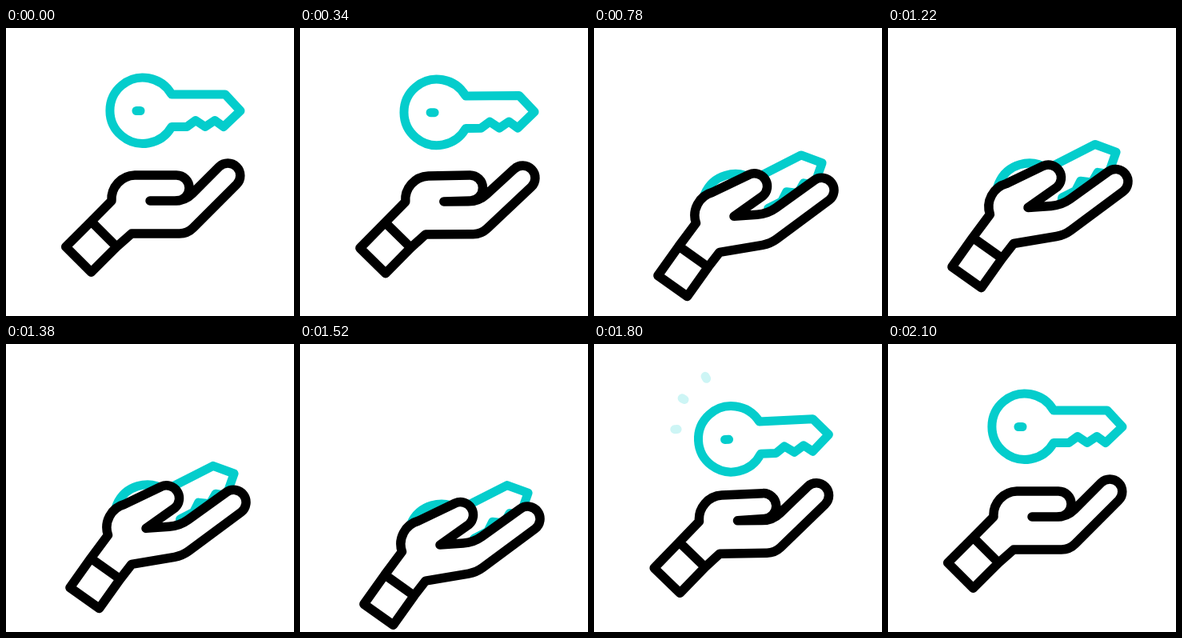
These frames come from a looping animation (360x360 px, 2420 ms). An HTML page:

```html
<!DOCTYPE html>
<html lang="en">
<head>
<meta charset="utf-8">
<title>Hand catching a key</title>
<style>
  html, body { margin: 0; width: 100%; height: 100%; overflow: hidden; background: #fff; }
  svg { display: block; width: 100%; height: 100%; }
  path { fill: none; stroke-linecap: round; stroke-linejoin: round; }
  .teal { stroke: #04cdcc; stroke-width: 11; }
  #hand { fill: #fff; stroke: #000; stroke-width: 11.5; }
</style>
</head>
<body>
<svg viewBox="0 0 360 360">
  <path id="sparks" class="teal"/>
  <g id="key" class="teal">
    <path d="M36-20.5H103L122 0 101 20 90 12 78 20 66 12 55 20H36A41.2 41.2 0 1 1 36-20.5Z"/>
    <path d="M-8 0H-3"/>
  </g>
  <path id="hand"/>
</svg>
<script>
const LOOP = 2420, STEP = 20;
const $ = id => document.getElementById(id);
const hand = $('hand'), key = $('key'), sparks = $('sparks');

const progress = (t, from, to) => Math.min(1, Math.max(0, (t - from) / (to - from)));
const mix = (a, b, k) => a + (b - a) * k;

// Point at a distance and an angle in degrees from a centre.
function polar([x, y], r, deg) {
  const a = deg * Math.PI / 180;
  return [x + r * Math.cos(a), y + r * Math.sin(a)];
}

// Fall to `drop`, settle at `hold`, wind up to `dip`, then spring back to 0.
function motion(t, drop, hold, dip, power) {
  if (t < 720) return drop * progress(t, 220, 720) ** power;
  if (t < 1570) {
    return hold + (drop - hold) * (1 - progress(t, 720, 940)) ** 2
      + (dip - hold) * progress(t, 1220, 1570) ** 2.4;
  }
  return dip * (1 - progress(t, 1570, 2100)) ** 4;
}

// Joints of the hand: open position, closed position.
const JOINTS = {
  cuff:    [[106.5, 273.5], [111.3, 304.8]],
  wrist:   [[132, 216], [127.5, 244.5]],
  knuckle: [[161, 184], [148, 206]],
  thumb:   [[213, 200], [200.5, 198.5]],
  crook:   [[180, 216], [175, 236]],
  web:     [[223.8, 216], [217, 233]],
  finger:  [[277.3, 184.5], [284.5, 203.5]],
  heel:    [[226.8, 257], [220.5, 270.3]],
  palm:    [[157, 257], [157, 281]]
};

const line = p => 'L' + p.join(' ');
const arc = (r, p) => `A${r} ${r} 0 0 1 ${p.join(' ')}`;

function toward(a, b, d) {
  const k = d / Math.hypot(b[0] - a[0], b[1] - a[1]);
  return [mix(a[0], b[0], k), mix(a[1], b[1], k)];
}

function bend(prev, corner, next, d) {
  return line(toward(corner, prev, d)) + `Q${corner.join(' ')} ` + toward(corner, next, d).join(' ');
}

function handPath(t) {
  const grip = motion(t, 1, 1, 1, 2.2);
  const curl = motion(t, 1, 1, 1, 1.3);   // the finger leads the palm
  const dy = motion(t, 9, -11.5, 27, 4);
  const at = (name, k = grip) => {
    const [a, b] = JOINTS[name];
    return [mix(a[0], b[0], k), mix(a[1], b[1], k) + dy];
  };

  const [right, bottom, left, top] = [0, 90, 180, 270].map(a => polar(at('cuff'), 31.8, a - 9.6 * grip));
  const thumbTop = polar(at('thumb'), 16, -90 - 24 * grip);
  const thumbLow = polar(at('thumb'), 16, 90 - 42 * grip);
  const aim = -45 + 8 * curl;
  const fingerTop = polar(at('finger', curl), 15.5, aim - 90);
  const fingerLow = polar(at('finger', curl), 15.5, aim + 90);
  const crook = at('crook'), palm = at('palm');

  return 'M' + top.join(' ') + line(at('wrist')) + arc(30, at('knuckle'))
    + line(thumbTop) + arc(16, thumbLow) + line(crook)
    + bend(crook, at('web'), fingerTop, 13) + line(fingerTop) + arc(15.5, fingerLow)
    + bend(fingerLow, at('heel'), palm, 10) + line(palm)
    + line(right) + line(bottom) + line(left) + 'Z' + line(right);
}

function sparkPath(u) {
  const inner = 67 + 27 * u ** 3, outer = 94 - 27 * (1 - u) ** 2;
  const centre = [171, 103];
  return [177, 210, 243]
    .map(deg => 'M' + polar(centre, inner, deg).join(' ') + line(polar(centre, outer, deg)))
    .join('');
}

function draw(t) {
  const tilt = 27 * motion(t, 1, 1, 1, 3);
  const y = 103.5 + motion(t, 132.5, 107, 152, 2.9);
  hand.setAttribute('d', handPath(t));
  key.setAttribute('transform', `translate(${171 + tilt * .2} ${y}) rotate(${-tilt})`);

  const u = progress(t, 1780, 2100);
  sparks.setAttribute('d', sparkPath(u));
  sparks.setAttribute('opacity', Math.sin(Math.PI * u).toFixed(3));
}

const start = performance.now();
function tick() {
  const t = (performance.now() - start) % LOOP;
  draw(Math.floor(t / STEP) * STEP);
  requestAnimationFrame(tick);
}
tick();
</script>
</body>
</html>
```
